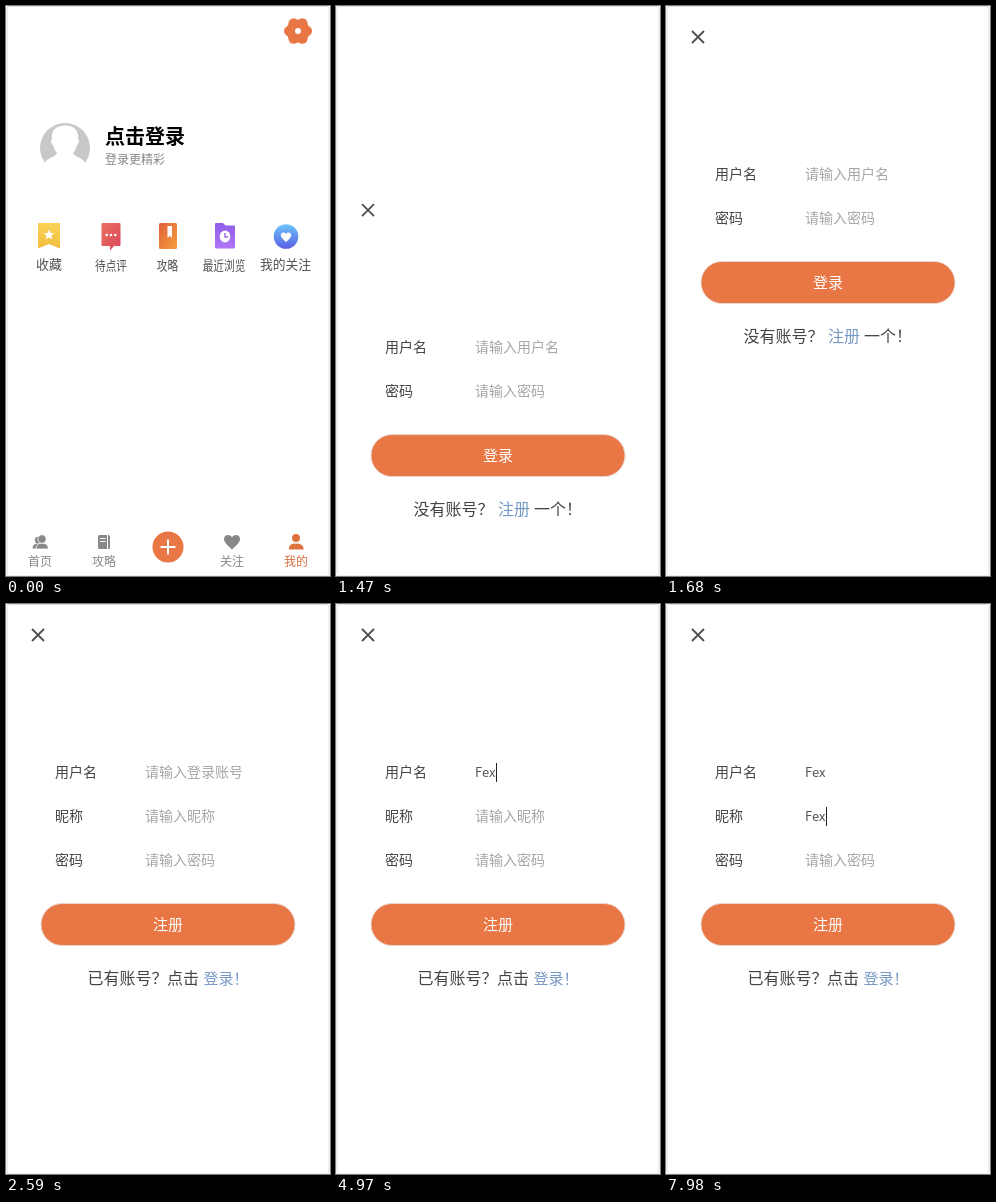
Recreate the animation shown at these times as an HTML page. Size 324x570 px, loop 8000 ms.

```html
<!DOCTYPE html>
<html lang="zh-CN">
<head>
<meta charset="utf-8">
<title>Sign up</title>
<style>
html, body { margin: 0; width: 100%; height: 100%; overflow: hidden; background: #fff; }
svg { display: block; width: 324px; height: 570px; }
text { font-family: "Noto Sans CJK SC", "Noto Sans CJK JP", "Noto Sans", sans-serif; font-size: 14px; fill: #444; white-space: pre; }
.hint { fill: #a6a6a6; }
.typed { font-size: 13px; fill: #555; }
.cta { font-size: 15px; fill: #fff; text-anchor: middle; }
.foot { font-size: 16px; }
.link { fill: #7698c4; }
.label { font-size: 13px; fill: #505050; text-anchor: middle; }
.tab { font-size: 12px; fill: #888; text-anchor: middle; }
</style>
</head>
<body>
<svg viewBox="0 0 324 570" xmlns="http://www.w3.org/2000/svg">
  <defs>
    <linearGradient id="gold" x2="0" y2="1"><stop stop-color="#f9d257"/><stop offset="1" stop-color="#f3bd3c"/></linearGradient>
    <linearGradient id="red" x2="1" y2="1"><stop stop-color="#ea7060"/><stop offset="1" stop-color="#d9485c"/></linearGradient>
    <linearGradient id="amber" x2="1" y2="1"><stop stop-color="#e0603c"/><stop offset="1" stop-color="#f6a03c"/></linearGradient>
    <linearGradient id="violet" x2="0" y2="1"><stop stop-color="#8f5cea"/><stop offset="1" stop-color="#b076f5"/></linearGradient>
    <linearGradient id="blue" x2="0" y2="1"><stop stop-color="#6cc4fb"/><stop offset="1" stop-color="#5a60e4"/></linearGradient>
    <path id="heart" d="M0 7C-4 3.6-8-.1-8-3.4C-8-8-2.5-9 0-5.2C2.5-9 8-8 8-3.4C8-.1 4 3.6 0 7Z"/>
  </defs>

  <rect width="324" height="570" fill="#fff"/>

  <g id="profile">
    <g id="gear" fill="#e87745"><circle cx="292" cy="25" r="11.600"/></g>
    <circle cx="292" cy="25" r="3" fill="#fff"/>

    <circle cx="59" cy="142" r="25" fill="#c8c8c8"/>
    <path fill="#fff" d="M46 133C45 124 50 119.500 59 119.500S73 124 72 133C73.500 134 73 138 71 139C70 143 68.500 145 67 147C68 151 77 151 80 158V169H38V158C41 151 50 151 51 147C49.500 145 48 143 47 139C45 138 44.500 134 46 133Z"/>
    <text x="99" y="138.300" style="font-size:20px;font-weight:700;fill:#000">点击登录</text>
    <text x="99" y="157.500" style="font-size:12px;fill:#888">登录更精彩</text>

    <path fill="url(#gold)" d="M32 217H54V242.500L43 238L32 242.500Z"/>
    <path id="star" fill="#fff"/>
    <path fill="url(#red)" d="M96.500 217H113.500Q114.500 217 114.500 218V239Q114.500 240 113.500 240H108L104 244.500V240H96.500Q95.500 240 95.500 239V218Q95.500 217 96.500 217Z"/>
    <g fill="#fff"><circle cx="100.700" cy="229" r="1.300"/><circle cx="105" cy="229" r="1.300"/><circle cx="109.300" cy="229" r="1.300"/></g>
    <rect x="153" y="217" width="18" height="26" rx="1.500" fill="url(#amber)"/>
    <path d="M161.500 220H166V232L163.800 230L161.500 232Z" fill="#fff"/>
    <path fill="url(#violet)" d="M210 217H217L219.500 219.500H228Q229 219.500 229 220.500V241Q229 242.500 228 242.500H210Q209 242.500 209 241V218Q209 217 210 217Z"/>
    <ellipse cx="219" cy="230.500" rx="5.300" ry="5.900" fill="#fff"/>
    <path d="M219 227V231H222" fill="none" stroke="#9c66f0" stroke-width="1.400"/>
    <circle cx="280" cy="230.500" r="12.300" fill="url(#blue)"/>
    <use href="#heart" transform="translate(280 231.500) scale(.65)" fill="#fff"/>
    <g id="labels"></g>

    <g fill="#888">
      <circle cx="32" cy="534" r="3.200"/><path d="M26.500 542.500Q26.500 537.500 32 537.500T37 542.500Z"/>
      <g stroke="#fff" stroke-width=".8"><path d="M30 543Q30 537 36 537T42.500 543Z"/><circle cx="36" cy="533" r="4.200"/></g>
      <rect x="92" y="529" width="12" height="14" rx="1.500"/>
      <path d="M94 532.500H99.500M94 535.500H99.500M101.500 529V543" stroke="#fff"/>
      <use href="#heart" transform="translate(226 536.500)"/>
    </g>
    <circle cx="162" cy="541" r="15.500" fill="#e87745"/>
    <path d="M154.500 541H169.500M162 533.500V548.500" stroke="#fff" stroke-width="2"/>
    <circle cx="290" cy="532" r="4" fill="#e07240"/>
    <path d="M283 543.500V542Q283 537.500 290 537.500T297.500 542V543.500Z" fill="#e07240"/>
    <g id="tabs"></g>
  </g>

  <g id="form">
    <path d="M26 25L38 37M38 25L26 37" stroke="#505050" stroke-width="1.800"/>
    <text x="49" y="173">用户名</text>
    <g id="login">
      <text class="hint" x="139" y="173">请输入用户名</text>
      <text x="49" y="217">密码</text>
      <text class="hint" x="139" y="217">请输入密码</text>
      <rect x="35" y="255.500" width="254" height="42" rx="21" fill="#e87745" stroke="#ead5ca"/>
      <text class="cta" x="162" y="282">登录</text>
      <text class="foot" x="77.500" y="336">没有账号？</text>
      <text class="foot link" x="162" y="336">注册</text>
      <text class="foot" x="198" y="336">一个！</text>
    </g>
    <g id="signup">
      <text id="user" x="139" y="173"></text>
      <text x="49" y="217">昵称</text>
      <text id="nick" x="139" y="217"></text>
      <text x="49" y="261">密码</text>
      <text class="hint" x="139" y="261">请输入密码</text>
      <rect x="35" y="299.500" width="254" height="42" rx="21" fill="#e87745" stroke="#ead5ca"/>
      <text class="cta" x="162" y="326">注册</text>
      <text class="foot" x="81.500" y="380">已有账号？</text>
      <text class="foot" x="161" y="380">点击</text>
      <text class="link" x="197.500" y="380" style="font-size:15px">登录！</text>
      <rect id="caret" width="1" height="19" fill="#222"/>
    </g>
  </g>

  <rect x="1" y=".5" width="322" height="569.500" rx="2" fill="none" stroke="#dedede"/>
</svg>
<script>
const $ = id => document.getElementById(id);
const LOOP = 8000, STEP = 70, NAME = "Fex";
const SLIDE = { start: 1370, length: 305, height: 570 };
const SIGNUP = 2590;
const USER_KEYS = [4060, 4620, 4970];
const NICK_KEYS = [7210, 7490, 7980];
// Spans in which the caret shows: [from, to, row]
const CARET = [[3150, 3640, 0], [4060, 4550, 0], [4620, 5530, 0],
               [5600, 6160, 1], [6650, 7140, 1], [7210, LOOP, 1]];

function add(parent, tag, attrs, text = "") {
  const el = document.createElementNS("http://www.w3.org/2000/svg", tag);
  for (const key in attrs) el.setAttribute(key, attrs[key]);
  el.textContent = text;
  parent.append(el);
  return el;
}

function build() {
  for (let i = 0; i < 6; i++) {
    const a = i * Math.PI / 3;
    add($("gear"), "circle", { cx: 292 + 8.8 * Math.cos(a), cy: 25 + 8.8 * Math.sin(a), r: 5.2 });
  }
  let star = "";
  for (let i = 0; i < 10; i++) {
    const r = i % 2 ? 2.5 : 5.6, a = i * Math.PI / 5;
    star += `${i ? "L" : "M"}${43 + r * Math.sin(a)} ${229 - r * Math.cos(a)}`;
  }
  $("star").setAttribute("d", star + "Z");

  // Three of the shortcuts are squeezed as a whole.
  [["收藏", 43, 262.5, 1], ["待点评", 105, 263.5, .82], ["攻略", 161.5, 263.5, .82],
   ["最近浏览", 218, 263.5, .82], ["我的关注", 279.5, 262.5, .98]].forEach(([name, x, y, squeeze]) =>
    add($("labels"), "text", { class: "label", transform: `translate(${x} ${y}) scale(${squeeze} 1)` }, name));

  ["首页", "攻略", "关注", "我的"].forEach((name, i) => {
    const x = [34, 98, 226, 290][i];
    const tab = add($("tabs"), "text", { class: "tab", x, y: 560 }, name);
    if (i === 3) tab.style.fill = "#d8703f";
  });
}

const show = (id, on) => $(id).setAttribute("display", on ? "inline" : "none");
const typed = (keys, t) => keys.filter(k => t >= k).length;

function field(id, count, hint) {
  $(id).textContent = count ? NAME.slice(0, count) : hint;
  $(id).setAttribute("class", count ? "typed" : "hint");
}

function draw(t) {
  const tick = Math.floor(t / STEP) * STEP;
  const p = Math.min(1, Math.max(0, (tick - SLIDE.start) / SLIDE.length));
  show("profile", p === 0);
  show("form", p > 0);
  $("form").setAttribute("transform", `translate(0 ${SLIDE.height * (1 - p) ** 3})`);
  show("login", t < SIGNUP);
  show("signup", t >= SIGNUP);

  const counts = [typed(USER_KEYS, t), typed(NICK_KEYS, t)];
  field("user", counts[0], "请输入登录账号");
  field("nick", counts[1], "请输入昵称");

  const span = CARET.find(([from, to]) => t >= from && t < to);
  show("caret", span);
  if (span) {
    const row = span[2];
    $("caret").setAttribute("x", 139 + 7 * counts[row]);
    $("caret").setAttribute("y", 159 + 44 * row);
  }
}

build();
draw(0);
let begin;
function frame(now) {
  begin ??= now;
  draw((now - begin) % LOOP);
  requestAnimationFrame(frame);
}
requestAnimationFrame(frame);
</script>
</body>
</html>
```
